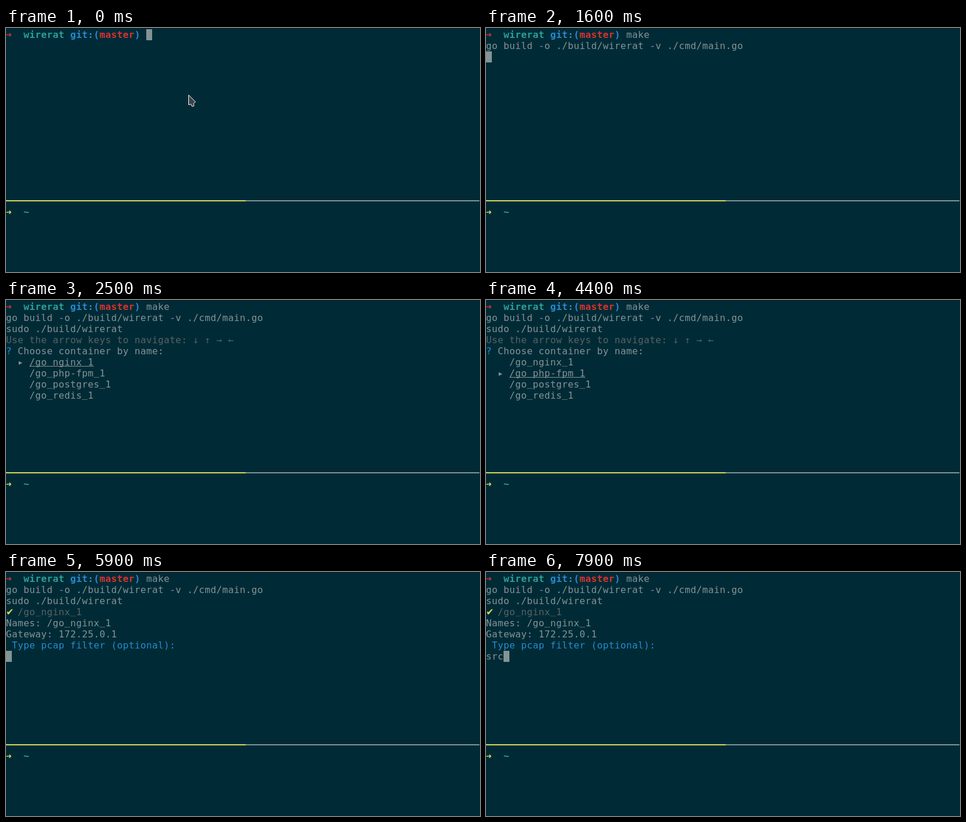
Recreate the animation shown at these times as an HTML page. Size 811 px wide and 418 px high, loop 8 s.

```html
<!DOCTYPE html>
<html lang="en">
<head>
<meta charset="utf-8">
<title>Terminal session</title>
<style>
  html, body { margin: 0; width: 100%; height: 100%; overflow: hidden; background: #002b36; }
  #stage {
    position: relative; width: 811px; height: 418px; overflow: hidden;
    background: #002b36; color: #839496;
    font: 16px/19px "DejaVu Sans Mono", monospace;
    font-variant-ligatures: none;
  }
  #stage::before { content: ""; position: absolute; width: 100%; height: 1px; background: #0b1a20; }
  .run { position: absolute; height: 19px; white-space: pre; letter-spacing: calc(10px - 1ch); }
  .run i { position: relative; top: -2px; font-style: normal; }
  .bold { font-weight: bold; }
  .red { color: #dc322f; }
  .cyan { color: #2aa198; }
  .blue { color: #268bd2; }
  .green { color: #d8d75f; }
  .faint { color: #576264; }
  .tick { font-family: "DejaVu Sans", sans-serif; letter-spacing: 0; }
  .picked::after {
    content: ""; position: absolute; left: 0; right: 0; top: 16px;
    height: 1px; background: currentColor;
  }
  .cursor { position: absolute; width: 10px; height: 19px; background: #839496; }
  .border { position: absolute; left: 0; top: 295px; width: 810px; height: 2px;
    background: linear-gradient(90deg, #d8d75f 410px, #839496 410px); }
  #pointer { position: absolute; left: 312px; top: 114px; }
</style>
</head>
<body>
<div id="stage">
  <div id="screen"></div>
  <div class="border"></div>
  <svg id="pointer" width="13" height="21" viewBox="0 0 13 21">
    <path d="M.5 .8V17.5L4.5 16.5 6.5 20.4 9.5 19.6 8.8 15.4 12.2 12.5Z"
      fill="#3d4245" stroke="#fff" stroke-linejoin="round"/>
  </svg>
</div>
<script>
const LOOP = 8000;
const CELL_W = 10, CELL_H = 19, TOP = 2;
const CONTAINERS = ['/go_nginx_1', '/go_php-fpm_1', '/go_postgres_1', '/go_redis_1'];
const screenEl = document.getElementById('screen');
const pointer = document.getElementById('pointer');

const at = (row, col) => `left:${col * CELL_W}px;top:${TOP + row * CELL_H}px`;
const run = (row, col, text, style = '') =>
  `<span class="run ${style}" style="${at(row, col)}">${text.replace(/_/g, '<i>_</i>')}</span>`;

const prompt = typed =>
  run(0, 0, '➜', 'bold red') + run(0, 3, 'wirerat', 'bold cyan') +
  run(0, 11, 'git:(', 'bold blue') + run(0, 16, 'master', 'bold red') +
  run(0, 22, ')', 'bold blue') + run(0, 24, typed) +
  run(16, 0, '➜', 'bold green') + run(16, 3, '~', 'bold cyan');

const building = () => prompt('make') + run(1, 0, 'go build -o ./build/wirerat -v ./cmd/main.go');
const launched = () => building() + run(2, 0, 'sudo ./build/wirerat');

const menu = picked => launched() +
  run(3, 0, 'Use the arrow keys to navigate: ', 'faint') +
  [...'↓↑→←'].map((arrow, i) => run(3, 32 + 2 * i, arrow, 'faint')).join('') +
  run(4, 0, '?', 'blue') + run(4, 2, 'Choose container by name:') +
  run(5 + picked, 2, '▸') +
  CONTAINERS.map((name, i) => run(5 + i, 4, name, i === picked ? 'picked' : '')).join('');

const filter = typed => launched() +
  run(3, 0, '✔', 'tick green') + run(3, 2, CONTAINERS[0], 'faint') +
  run(4, 0, 'Names: ' + CONTAINERS[0]) +
  run(5, 0, 'Gateway: 172.25.0.1') +
  run(6, 1, 'Type pcap filter (optional):', 'blue') +
  run(7, 0, typed);

// start time, view, its argument, cursor cell [row, col] when lit
const STEPS = [
  [0, prompt, '', [0, 24]],
  [500, prompt, ''],
  [700, prompt, 'm', [0, 25]],
  [900, prompt, 'mak', [0, 27]],
  [1100, prompt, 'make', [0, 28]],
  [1600, building, '', [2, 0]],
  [2100, building, ''],
  [2400, launched, ''],
  [2500, menu, 0],
  [4400, menu, 1],
  [4600, menu, 2],
  [4900, menu, 1],
  [5200, menu, 0],
  [5900, filter, '', [7, 0]],
  [6500, filter, ''],
  [7100, filter, 's', [7, 1]],
  [7700, filter, 'sr', [7, 2]],
  [7900, filter, 'src', [7, 3]],
];

let shown = null;
function draw(time) {
  const step = STEPS.findLast(([start]) => start <= time);
  if (step === shown) return;
  shown = step;
  const [start, view, arg, cursor] = step;
  screenEl.innerHTML = view(arg) + (cursor ? `<div class="cursor" style="${at(...cursor)}"></div>` : '');
  pointer.style.display = start < 700 ? '' : 'none';
}

const began = performance.now();
function tick() {
  draw((performance.now() - began) % LOOP);
  requestAnimationFrame(tick);
}
tick();
</script>
</body>
</html>
```
